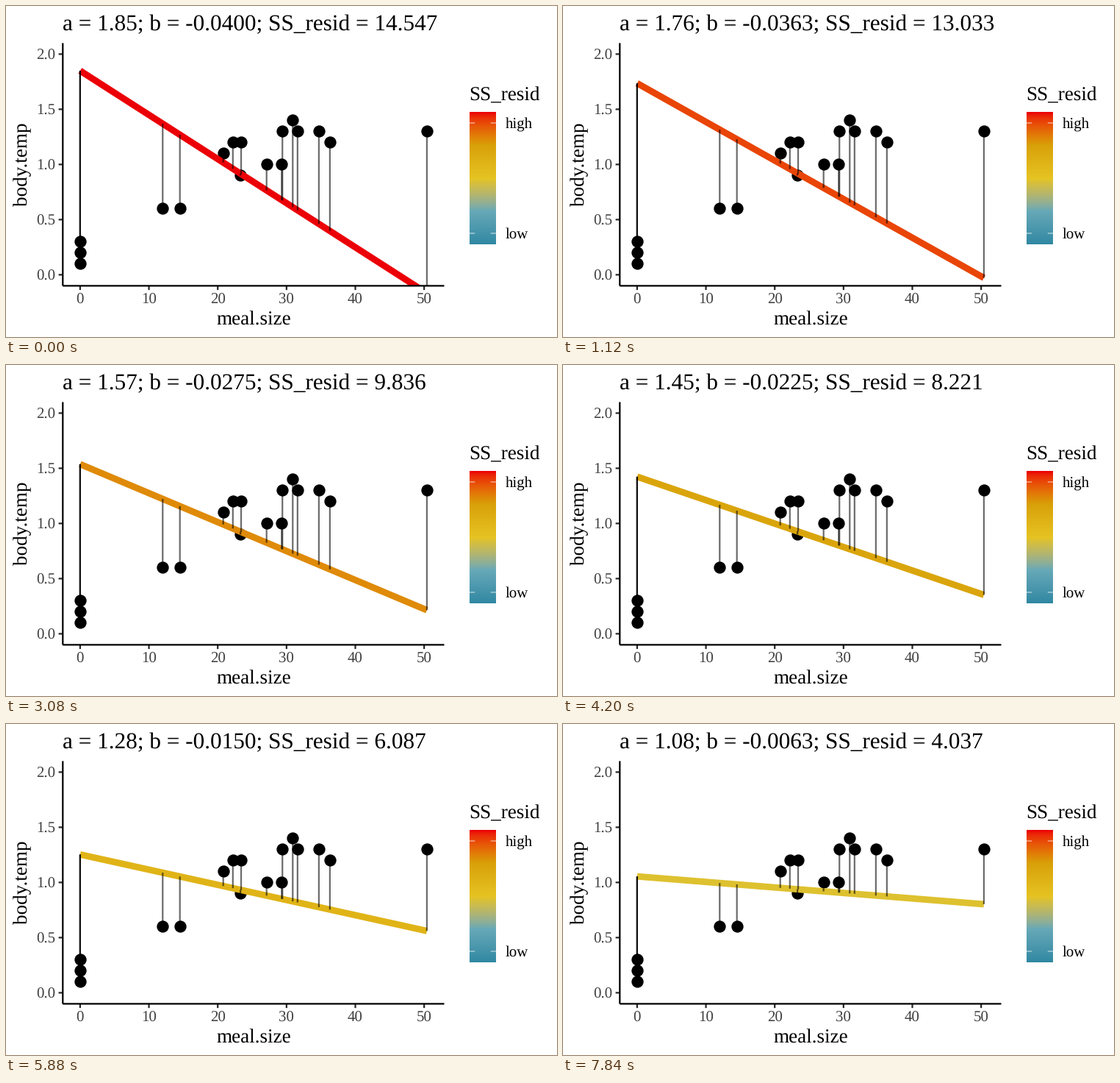
Animation, 750 px wide and 450 px high, one loop 8 s. Source, as a matplotlib script:

```python
import numpy as np
import matplotlib.pyplot as plt
from matplotlib.animation import FuncAnimation
from matplotlib.collections import LineCollection
from matplotlib.patches import Rectangle

plt.rcParams.update({
    "font.family": "Liberation Serif",
    "text.hinting": "none",
    "path.snap": False,
})

W, H, DPI = 750, 450, 100
PT = 72 / DPI  # points per pixel

# Sample and least-squares sums
meal = np.array([0, 0, 0, 12, 14.5, 20.8, 22.2, 23.3, 23.4,
                 27.1, 29.3, 29.4, 30.9, 31.6, 34.7, 36.3, 50.4])
temp = np.array([.1, .2, .3, .6, .6, 1.1, 1.2, .9, 1.2,
                 1, 1, 1.3, 1.4, 1.3, 1.3, 1.2, 1.3])
B_START, B_STEP, STEPS_TO_FIT = -0.04, 0.00125, 54
TICK_MS, STEP_MS, LOOP_MS = 40, 280, 8000

# Panel edges in pixels
LEFT, RIGHT, TOP, BOTTOM = 77.3, 596.5, 50.4, 380.4


def px(x):
    return LEFT + (np.asarray(x) / 50.4 + 0.05) / 1.1 * (RIGHT - LEFT)


def py(y):
    return BOTTOM - (np.asarray(y) + 0.1) / 2.2 * (BOTTOM - TOP)


# ---- colour: Lab ramp shown in a gamma 1.8 RGB space ----
def rgb_matrix(primaries, white):
    m = np.array([[x / y, 1, (1 - x - y) / y] for x, y in primaries]).T
    return m * np.linalg.solve(m, white)


WHITE = np.array([0.9505, 1, 1.089])
SRGB = rgb_matrix([(.64, .33), (.30, .60), (.15, .06)], WHITE)
DISPLAY = rgb_matrix([(.63, .34), (.295, .605), (.155, .077)], WHITE)
PALETTE = ["3B9AB2", "78B7C5", "EBCC2A", "E1AF00", "F21A00"]


def to_lab(code):
    v = np.array([int(code[i:i + 2], 16) for i in (0, 2, 4)]) / 255
    lin = np.where(v > 0.04045, ((v + 0.055) / 1.055) ** 2.4, v / 12.92)
    t = SRGB @ lin / WHITE
    fx, fy, fz = np.where(t > 0.008856, np.cbrt(t), 7.787 * t + 16 / 116)
    return 116 * fy - 16, 500 * (fx - fy), 200 * (fy - fz)


LAB = np.array([to_lab(code) for code in PALETTE])


def ramp(t):
    """Colour at t, from 0 (low) to 1 (high)."""
    light, a, b = (np.interp(t, np.linspace(0, 1, 5), col) for col in LAB.T)
    fy = (light + 16) / 116
    f = np.array([fy + a / 500, fy, fy - b / 200])
    xyz = WHITE * np.where(f > 0.2069, f ** 3, (f - 16 / 116) / 7.787)
    # clip to sRGB first, as the ramp colours are 8-bit sRGB
    lin = np.clip(np.linalg.solve(SRGB, xyz), 0, 1)
    out = np.linalg.solve(DISPLAY, SRGB @ lin)
    return np.clip(out, 0, 1) ** (1 / 1.8)


# ---- static parts ----
fig = plt.figure(figsize=(W / DPI, H / DPI), dpi=DPI, facecolor="white")
ax = fig.add_axes([0, 0, 1, 1])
ax.axis("off")


def label(x, y, text, size, color="black", **kw):
    return ax.text(x, y, text, fontsize=size * PT, color=color,
                   va="baseline", **kw)


def stroke(xs, ys, width, color, zorder=6):
    return ax.plot(xs, ys, color=color, lw=width * PT, zorder=zorder,
                   solid_capstyle="butt")[0]


TITLE, AXIS, SMALL = 31.25, 27.08, 20.83
GREY, TICK = "#404040", "#282828"
THIN = 2.22

stroke([LEFT, LEFT], [TOP, BOTTOM], THIN, "black")
stroke([LEFT, RIGHT], [BOTTOM, BOTTOM], THIN, "black")
for x in range(0, 51, 10):
    stroke([px(x)] * 2, [BOTTOM, BOTTOM + 5.7], THIN, TICK, 5)
    label(px(x), 405, str(x), SMALL, GREY, ha="center")
for y in np.arange(0, 2.1, 0.5):
    stroke([LEFT - 5.7, LEFT], [py(y)] * 2, THIN, TICK, 5)
    label(66.8, py(y) + 7.2, f"{y:.1f}", SMALL, GREY, ha="right")

label((LEFT + RIGHT) / 2, 433.6, "meal.size", AXIS, ha="center")
label(29.3, (TOP + BOTTOM) / 2, "body.temp", AXIS, ha="center",
      rotation=90, rotation_mode="anchor")

label(630.5, 128.3, "SS_resid", AXIS)
bar = np.array([[ramp(t)] for t in np.linspace(1, 0, 180)])
ax.imshow(bar, extent=(631, 667, 324, 144), aspect="auto")
for y, text in ((159, "high"), (309, "low")):
    for x in (631, 659.8):
        stroke([x, x + 7.2], [y, y], 0.8, "white")
    label(680, y + 7.2, text, SMALL)

ax.scatter(px(meal), py(temp), s=(16.3 * PT) ** 2, c="black", lw=0, zorder=2)
ax.set(xlim=(0, W), ylim=(H, 0))

# ---- moving parts ----
title = label(77.3, 33.2, "", TITLE)
fit_line = stroke([], [], 8.89, "red", 3)
residuals = LineCollection([], colors=[(0, 0, 0, 0.576)],
                           linewidths=THIN * PT, zorder=4)
ax.add_collection(residuals, autolim=False)
panel = Rectangle((LEFT, TOP), RIGHT - LEFT, BOTTOM - TOP,
                  transform=ax.transData)
for artist in (fit_line, residuals):
    artist.set_clip_path(panel)


def model(step):
    b = B_START + B_STEP * step
    a = temp.mean() - b * meal.mean()
    return a, b


def update(i):
    step = i * TICK_MS // STEP_MS
    a, b = model(step)
    fitted = a + b * meal
    ends = meal[[0, -1]]
    fit_line.set_data(px(ends), py(a + b * ends))
    fit_line.set_color(ramp(1 - step / STEPS_TO_FIT))
    residuals.set_segments([[(x, y0), (x, y1)] for x, y0, y1
                            in zip(px(meal), py(temp), py(fitted))])

    # the caption trails the line by one step
    a, b = model(max(step - 1, 0))
    ss = ((temp - a - b * meal) ** 2).sum()
    # nudge so that exact halves round away from zero
    title.set_text(f"a = {a:.2f}; b = {b - 1e-9:.4f}; SS_resid = {ss:.3f}")
    return fit_line, residuals, title


anim = FuncAnimation(fig, update, frames=LOOP_MS // TICK_MS,
                     interval=TICK_MS, repeat=True, repeat_delay=0)
plt.show()
```
